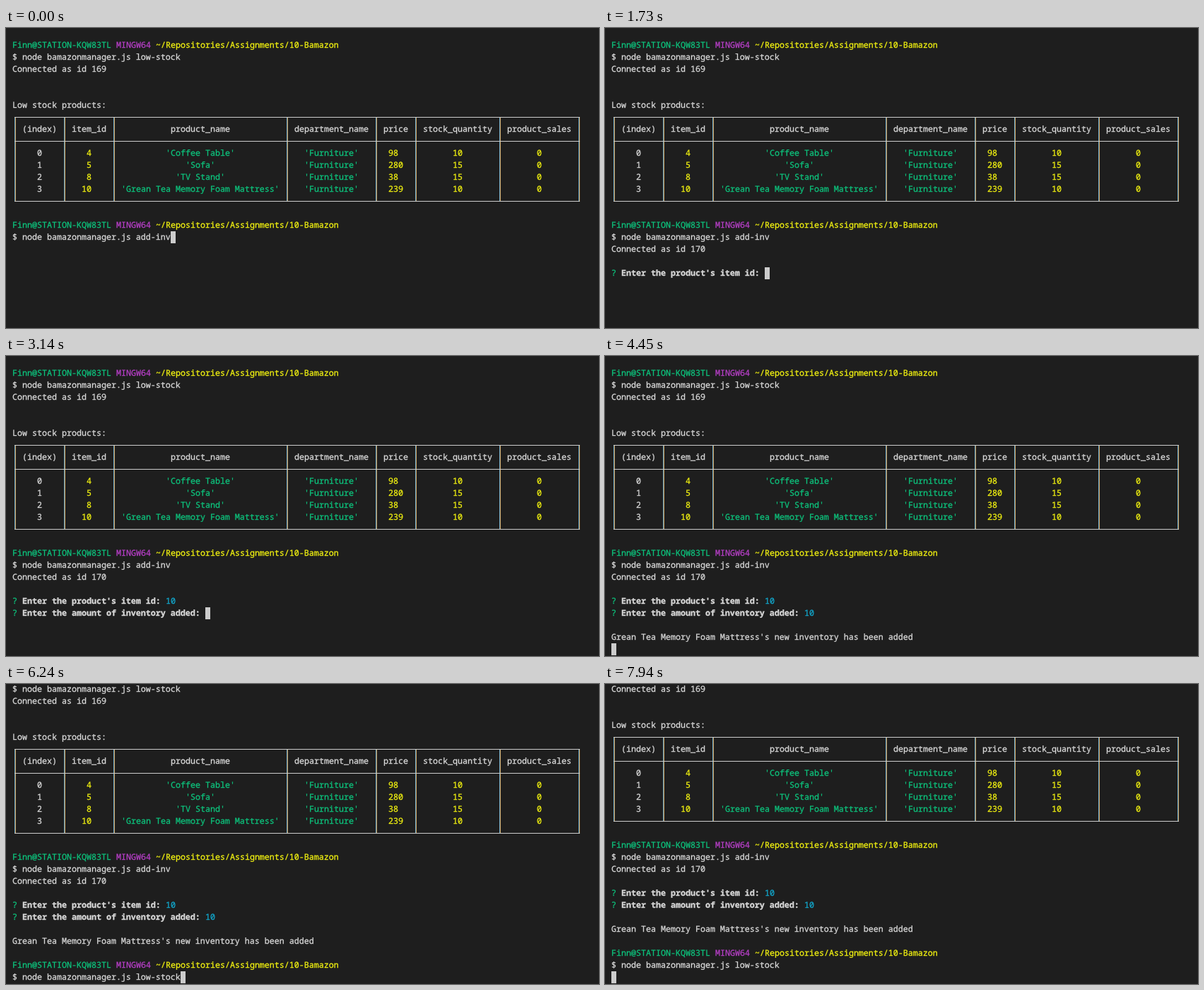
An HTML page for the animation above (8 s loop, 839 by 425 pixels).

```html
<!DOCTYPE html>
<html lang="en">
<head>
<meta charset="utf-8">
<title>Terminal session</title>
<style>
  html, body { margin: 0; width: 100%; height: 100%; overflow: hidden; background: #1e1e1e; }
  svg {
    display: block;
    width: 839px;
    height: 425px;
    font: 11.6667px "Noto Sans Mono", "DejaVu Sans Mono", monospace;
  }
  text {
    white-space: pre;
    text-rendering: geometricPrecision;
    stroke-width: 0.3px;
  }
</style>
</head>
<body>
<svg viewBox="0 0 839 425"><g id="screen"></g></svg>
<script>
const LOOP = 8000, CELL_W = 7, CELL_H = 17, LEFT = 9, TOP = 16, BASELINE = 12;
const FG = '#d8d8d8', GREEN = '#0dc27c', MAGENTA = '#b63fc6', YELLOW = '#f0f010', CYAN = '#11a8cd';
const BLOCK = '#cccccc', EDGE_BLUE = '#6cabcc', EDGE_ORANGE = '#cc9c58';

const screen = document.getElementById('screen');
const timed = [];

const px = col => LEFT + col * CELL_W;
const py = row => TOP + row * CELL_H;

function add(tag, attrs) {
  const el = document.createElementNS('http://www.w3.org/2000/svg', tag);
  for (const name in attrs) el.setAttribute(name, attrs[name]);
  screen.appendChild(el);
  return el;
}

function rect(x, y, width, height, fill) {
  return add('rect', { x, y, width, height, fill });
}

function put(row, col, str, fill = FG, from = 0, to = LOOP, weight = 400) {
  const el = add('text', { x: px(col), y: py(row) + BASELINE, fill, stroke: fill, 'font-weight': weight });
  el.textContent = str;
  if (from > 0 || to < LOOP) timed.push({ el, from, to });
}

function prompt(row, from) {
  put(row, 0, 'Finn@STATION-KQW83TL', GREEN, from);
  put(row, 21, 'MINGW64', MAGENTA, from);
  put(row, 29, '~/Repositories/Assignments/10-Bamazon', YELLOW, from);
}

function command(row, action, from, to) {
  put(row, 2, 'node bamazonmanager.js ' + action, FG, from, to);
}

// Typed digits stay plain until the answer is confirmed in cyan.
function question(row, label, asked, first, second, done) {
  const col = label.length + 3;
  put(row, 0, '?', GREEN, asked);
  put(row, 2, label, FG, asked, LOOP, 700);
  put(row, col, '1', FG, first, done);
  put(row, col + 1, '0', FG, second, done);
  put(row, col, '10', CYAN, done);
}

function table(row) {
  const edges = [0, 10, 20, 55, 73, 81, 98, 114];
  const heads = ['(index)', 'item_id', 'product_name', 'department_name', 'price', 'stock_quantity', 'product_sales'];
  const colors = [FG, YELLOW, GREEN, GREEN, YELLOW, YELLOW, YELLOW];
  const items = [
    [4, 'Coffee Table', 98, 10],
    [5, 'Sofa', 280, 15],
    [8, 'TV Stand', 38, 15],
    [10, 'Grean Tea Memory Foam Mattress', 239, 10]
  ];
  const cells = (r, values, fills) => values.forEach((value, i) => {
    const str = String(value), room = edges[i + 1] - edges[i] - 1;
    put(r, edges[i] + 1 + Math.floor((room - str.length) / 2), str, fills[i]);
  });
  const mid = r => py(r) + 8;

  // Each vertical has the two colour fringes of subpixel rendering.
  for (const col of edges) {
    rect(px(col) + 3, mid(row), 1, 7 * CELL_H + 1, EDGE_BLUE);
    rect(px(col) + 4, mid(row), 1, 7 * CELL_H + 1, EDGE_ORANGE);
  }
  for (const r of [row, row + 2, row + 7]) rect(px(0) + 3, mid(r), 114 * CELL_W + 2, 1, BLOCK);

  cells(row + 1, heads, heads.map(() => FG));
  items.forEach(([id, name, price, stock], i) =>
    cells(row + 3 + i, [i, id, `'${name}'`, "'Furniture'", price, stock, 0], colors));
}

prompt(0);
put(1, 0, '$');
command(1, 'low-stock');
put(2, 0, 'Connected as id 169');
put(5, 0, 'Low stock products:');
table(6);

prompt(15);
put(16, 0, '$');
command(16, 'add-inv');
put(17, 0, 'Connected as id 170', FG, 1730);
question(19, "Enter the product's item id:", 1730, 2280, 2360, 3140);
question(20, 'Enter the amount of inventory added:', 3140, 3840, 3920, 4450);
put(22, 0, "Grean Tea Memory Foam Mattress's new inventory has been added", FG, 4450);

prompt(24, 4990);
put(25, 0, '$', FG, 4990);
command(25, 'add-inv', 6010, 6240);
command(25, 'low-stock', 6240, 6850);
command(25, 'low-stock', 7170);

const cursor = rect(0, 0, CELL_W, CELL_H, BLOCK);

// time, cursor row, cursor column, rows scrolled
const steps = [
  [0, 16, 32, 0], [690, 17, 0, 0], [1730, 19, 31, 0], [2280, 19, 32, 0], [2360, 19, 33, 0],
  [3140, 20, 39, 0], [3840, 20, 40, 0], [3920, 20, 41, 0], [4450, 23, 0, 0],
  [4990, 25, 2, 2], [6010, 25, 32, 2], [6240, 25, 34, 2], [6850, 25, 2, 2],
  [7170, 25, 34, 2], [7940, 26, 0, 3]
];

const start = performance.now();

function draw() {
  const t = Math.max(0, performance.now() - start) % LOOP;
  const [, row, col, scroll] = steps.filter(step => step[0] <= t).pop();
  cursor.setAttribute('x', px(col));
  cursor.setAttribute('y', py(row));
  screen.setAttribute('transform', `translate(0 ${-scroll * CELL_H})`);
  for (const { el, from, to } of timed) {
    el.setAttribute('visibility', t >= from && t < to ? 'visible' : 'hidden');
  }
  requestAnimationFrame(draw);
}
draw();
</script>
</body>
</html>
```
